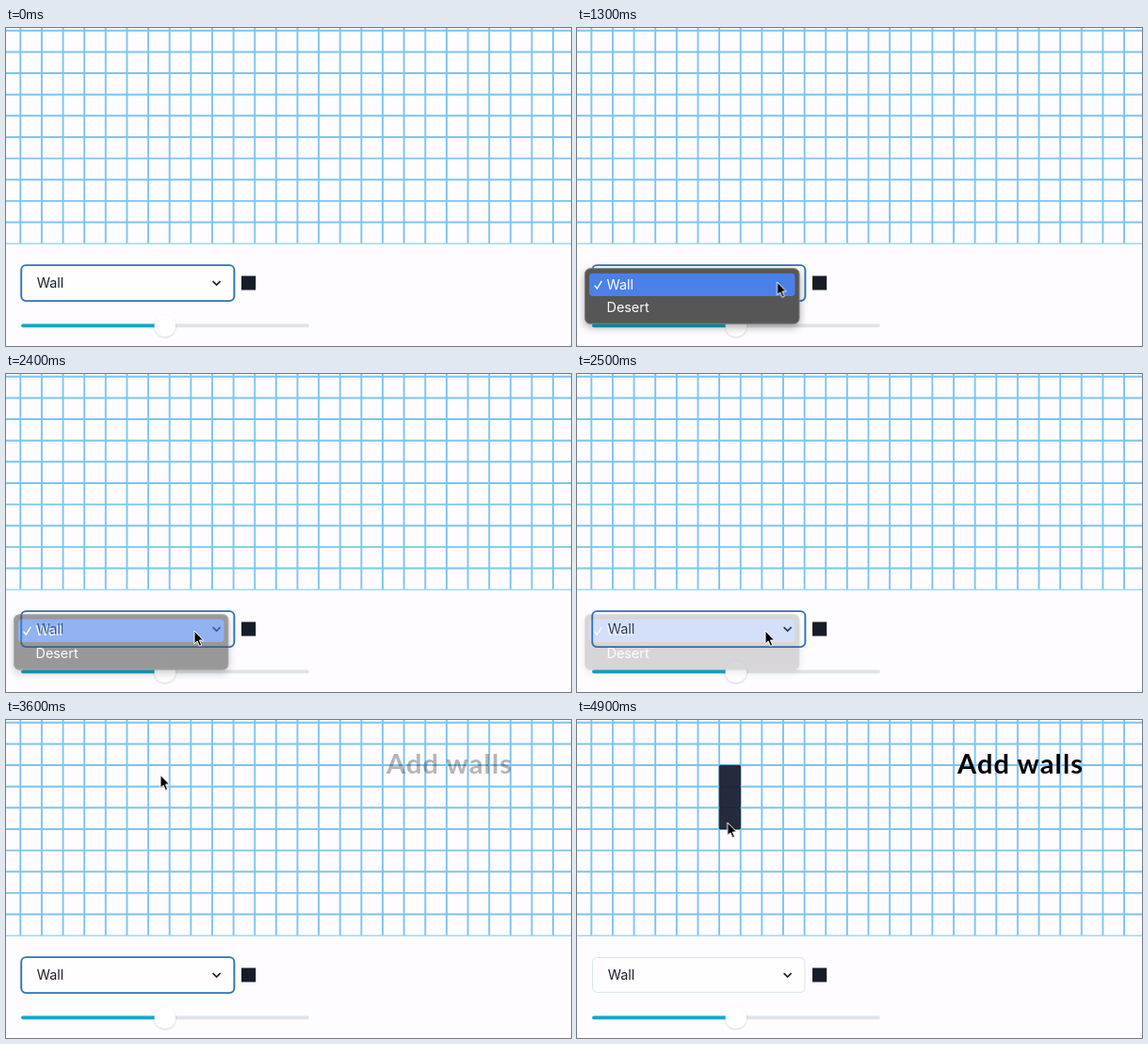
Write an HTML page that moves like this. It is 600 px wide and 338 px high and loops after 5 s.

```html
<!DOCTYPE html>
<html lang="en">
<head>
<meta charset="utf-8">
<title>Add walls</title>
<style>
html, body { margin: 0; width: 100%; height: 100%; overflow: hidden; background: #fefcff; }
svg { display: block; width: 100%; height: 100%; }
text { font-family: Inter, "Liberation Sans", sans-serif; font-size: 14.4px; }
#title { font: 700 29px Lato, sans-serif; letter-spacing: 1.1px; }

#cursor, #popup, #title, #focus, .wall { animation: 5s linear infinite; }
#cursor { animation-name: move; }
#popup { animation-name: popup; }
#title { animation-name: title; }
#focus { animation-name: focus; }
.wall { opacity: 0; animation-timing-function: step-end; }
#w1 { animation-name: wall1; }
#w2 { animation-name: wall2; }
#w3 { animation-name: wall3; }

@keyframes move {
  0%, 9.99% { transform: translate(400px, 345px); }
  10% { transform: translate(374px, 322px); }
  12% { transform: translate(330px, 303px); }
  14% { transform: translate(285px, 288px); }
  16% { transform: translate(250px, 278px); }
  18% { transform: translate(225px, 272px); }
  20%, 26% { transform: translate(212.5px, 270px); }
  34%, 42% { transform: translate(202px, 270.5px); }
  48%, 56% { transform: translate(200px, 273px); animation-timing-function: ease-in-out; }
  68% { transform: translate(165px, 70px); }
  72%, 77% { transform: translate(164px, 58.5px); }
  82% { transform: translate(162.7px, 66.5px); }
  92% { transform: translate(161px, 91px); }
  98%, 100% { transform: translate(159.7px, 109px); }
}
@keyframes popup {
  0%, 25.99% { opacity: 0; }
  26%, 46% { opacity: 1; }
  48% { opacity: .6; }
  50% { opacity: .23; }
  52%, 100% { opacity: 0; }
}
@keyframes title {
  0%, 70% { opacity: 0; }
  72% { opacity: .28; }
  77%, 100% { opacity: 1; }
}
@keyframes focus {
  0%, 78% { opacity: 1; }
  82%, 100% { opacity: 0; }
}
@keyframes wall1 { 0% { opacity: 0; } 80%, 100% { opacity: 1; } }
@keyframes wall2 { 0% { opacity: 0; } 86%, 100% { opacity: 1; } }
@keyframes wall3 { 0% { opacity: 0; } 94%, 100% { opacity: 1; } }
</style>
</head>
<body>
<svg viewBox="0 0 600 338">
  <defs>
    <filter id="soft" x="-20%" y="-40%" width="140%" height="200%">
      <feDropShadow dx="0" dy="3" stdDeviation="4" flood-opacity=".35"/>
    </filter>
    <filter id="lift" x="-30%" y="-30%" width="160%" height="170%">
      <feDropShadow dx="0" dy="1" stdDeviation="1" flood-opacity=".2"/>
    </filter>
  </defs>
  <rect width="600" height="338" fill="#fefcff"/>
  <path id="grid" fill="none" stroke="#7ec4ef" stroke-width="1.9"/>
  <path d="M0 229.2H600" stroke="#a5d8f2" stroke-width="1.4"/>

  <g fill="#252b3b" stroke="#1b2130" stroke-width=".8">
    <rect id="w1" class="wall" x="151.2" y="48.3" width="22.4" height="22.4" rx="1"/>
    <rect id="w2" class="wall" x="151.2" y="70.9" width="22.4" height="22.4" rx="1"/>
    <rect id="w3" class="wall" x="151.2" y="93.5" width="22.4" height="22.4" rx="1"/>
  </g>
  <text id="title" x="404" y="57">Add walls</text>

  <rect x="16.5" y="252.5" width="225.5" height="37" rx="5" fill="#fefdff" stroke="#d9e5ea"/>
  <rect id="focus" x="16.2" y="252.1" width="226.2" height="38" rx="5" fill="none" stroke="#2f74b8" stroke-width="1.9"/>
  <text x="32.7" y="276.4" fill="#1a202c">Wall</text>
  <path d="M219.6 269.2l4 3.9 4-3.9" fill="none" stroke="#1a202c" stroke-width="1.7"/>
  <rect x="250" y="263.5" width="15.2" height="15" fill="#171c29"/>

  <g stroke-width="3.8" stroke-linecap="round">
    <path d="M18 316.3H320" stroke="#dee3eb"/>
    <path d="M18 316.3H169" stroke="#12a8ca"/>
  </g>
  <circle cx="168.8" cy="316.5" r="11.2" fill="#fff" filter="url(#lift)"/>

  <g id="popup">
    <rect x="8.5" y="255.7" width="227.5" height="58.6" rx="5.5" fill="#575757" stroke="#777" filter="url(#soft)"/>
    <rect x="13" y="260.8" width="218.5" height="24.2" rx="4" fill="#4a80e8"/>
    <path d="M18.6 273.6l2.7 3.4 5-8.2" fill="none" stroke="#fff" stroke-width="1.4"/>
    <g fill="#fff">
      <text x="31.5" y="277.5">Wall</text>
      <text x="31.5" y="302">Desert</text>
    </g>
  </g>

  <path id="cursor" d="M0 0V13.8L3.1 10.9 5.4 16.2 7.7 15.2 5.4 10H9.7Z" stroke="#fff" stroke-width="1"/>
</svg>
<script>
const step = 22.63, left = 15.3, top0 = 2.8;
let d = "";
for (let i = 0; i < 26; i++) d += `M${left + i * step} 0V229`;
for (let i = 0; i < 10; i++) d += `M0 ${top0 + i * step}H600`;
document.getElementById("grid").setAttribute("d", d);
</script>
</body>
</html>
```
